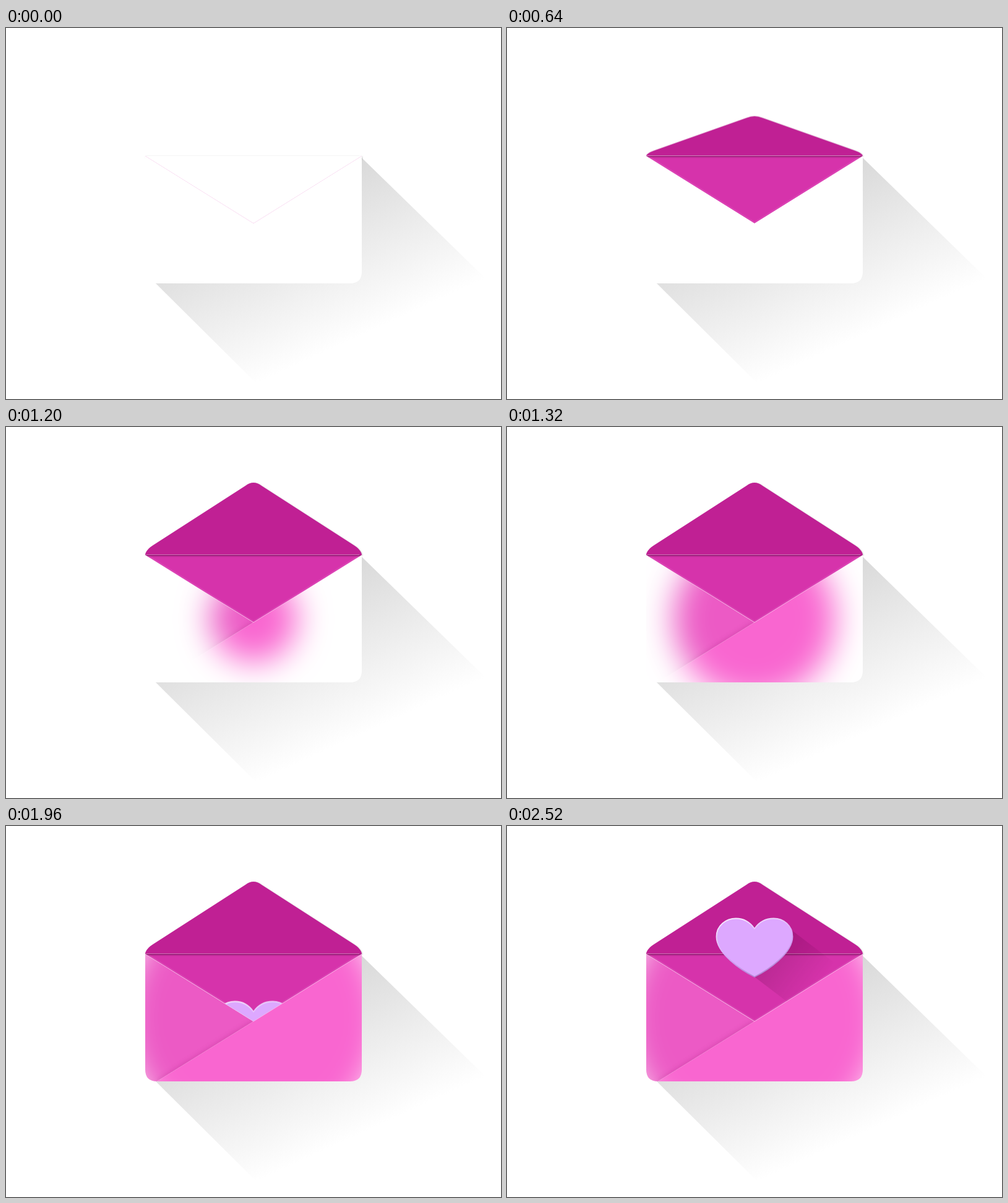
An HTML page for the animation above (3520 ms loop, 800 by 600 pixels).

```html
<!DOCTYPE html>
<html lang="en">
<head>
<meta charset="utf-8">
<title>Envelope</title>
<style>
html, body { margin: 0; width: 100%; height: 100%; overflow: hidden; background: #fff; }
svg { display: block; width: 100vw; height: 100vh; }

.flap, .fill, .heart, .cast, .glint { animation: 3520ms linear infinite; }
.flap { transform-origin: 400px 207px; animation-name: open; }
.fill { animation-name: spread; }
.heart { animation-name: rise; }
.cast { animation-name: deepen; }
.glint { animation-name: pass; }
.inner { filter: drop-shadow(1px 1px 1px rgba(0, 0, 0, .25)); }
.outer { filter: drop-shadow(0 1px 1.5px rgba(70, 0, 50, .75)); }

@keyframes open {
  0%, 2.273% { transform: scaleY(-1); }
  4.545% { transform: scaleY(-.9); }
  6.818% { transform: scaleY(-.72); }
  9.091% { transform: scaleY(-.5); }
  11.364% { transform: scaleY(-.256); }
  13.636% { transform: scaleY(.02); }
  15.909% { transform: scaleY(.3); }
  17.045% { transform: scaleY(.435); }
  19.318% { transform: scaleY(.66); }
  21.591% { transform: scaleY(.84); }
  23.864% { transform: scaleY(.96); }
  26.136% { transform: scaleY(1.017); }
  27.273% { transform: scaleY(1.024); }
  29.545% { transform: scaleY(1.013); }
  31.818% { transform: scaleY(1.003); }
  32.955%, 100% { transform: scaleY(1); }
}
@keyframes spread {
  0%, 30.114% { r: 0px; }
  42.045%, 100% { r: 210px; }
}
@keyframes rise {
  0%, 53.409% { transform: translateY(165px); }
  54.545% { transform: translateY(148px); }
  57.955% { transform: translateY(108px); }
  60.227% { transform: translateY(82px); }
  62.5% { transform: translateY(58px); }
  64.773% { transform: translateY(36px); }
  67.045% { transform: translateY(17px); }
  69.318% { transform: translateY(5px); }
  70.455% { transform: translateY(2px); }
  71.591%, 100% { transform: translateY(0); }
}
@keyframes deepen {
  0%, 57.955% { opacity: 0; }
  62.5% { opacity: .3; }
  71.591%, 100% { opacity: 1; }
}
@keyframes pass {
  0%, 5% { opacity: 0; }
  9%, 12% { opacity: .5; }
  16%, 100% { opacity: 0; }
}
</style>
</head>
<body>
<svg viewBox="0 0 800 600">
  <defs>
    <linearGradient id="ground" gradientUnits="userSpaceOnUse" x1="575" y1="210" x2="684" y2="447">
      <stop stop-color="#d9d9d9"/>
      <stop offset="1" stop-color="#fff"/>
    </linearGradient>
    <linearGradient id="heartShade" gradientUnits="userSpaceOnUse" x1="424" y1="203" x2="500" y2="260">
      <stop stop-color="#400030" stop-opacity=".2"/>
      <stop offset="1" stop-color="#400030" stop-opacity="0"/>
    </linearGradient>
    <linearGradient id="flapShade" gradientUnits="userSpaceOnUse" x1="310" y1="0" x2="420" y2="0">
      <stop stop-color="#400030" stop-opacity="0"/>
      <stop offset="1" stop-color="#400030" stop-opacity=".12"/>
    </linearGradient>
    <linearGradient id="rim" gradientUnits="userSpaceOnUse" x1="385" y1="150" x2="415" y2="240">
      <stop stop-color="#f4e4ff"/>
      <stop offset=".5" stop-color="#d6a3f6"/>
      <stop offset="1" stop-color="#b384d4"/>
    </linearGradient>
    <filter id="soft" filterUnits="userSpaceOnUse" x="0" y="0" width="800" height="600" color-interpolation-filters="sRGB">
      <feGaussianBlur stdDeviation="26"/>
    </filter>
    <filter id="crease" filterUnits="userSpaceOnUse" x="200" y="190" width="400" height="250" color-interpolation-filters="sRGB">
      <feGaussianBlur stdDeviation="3"/>
    </filter>
    <path id="flapShape" d="M225 207C225 202 231 195 238 191L387 95Q400 85 413 95L562 191C569 195 575 202 575 207Z"/>
    <path id="body" d="M225 207H575V394Q575 413 556 413H244Q225 413 225 394Z"/>
    <clipPath id="bodyClip"><use href="#body"/></clipPath>
    <clipPath id="pocket"><path d="M225 207H575L400 316Z"/></clipPath>
    <clipPath id="behind"><path d="M225 0H575V207L400 316L225 207Z"/></clipPath>
    <clipPath id="leftFace"><path d="M225 207L400 316L244 413H225Z"/></clipPath>
    <mask id="bloom" maskUnits="userSpaceOnUse" x="0" y="0" width="800" height="600">
      <g filter="url(#soft)"><circle class="fill" cx="400" cy="310" r="0" fill="#fff"/></g>
    </mask>
  </defs>

  <path fill="url(#ground)" d="M575 210L775 405L405 575L241 412Z"/>
  <path class="glint" fill="#f4f4f4" d="M575 207L630 217L622 238L575 255Z"/>

  <g class="inner"><use class="flap" href="#flapShape" fill="#c02094"/></g>
  <use href="#body" fill="#fff"/>
  <path d="M226 207H571" stroke="#eee" stroke-width=".8"/>

  <g clip-path="url(#pocket)">
    <path fill="#d633ab" d="M225 207H575L400 316Z"/>
    <path d="M225 207L400 316L575 207" fill="none" stroke="#e252bd" stroke-width="5" opacity=".5"/>
    <path class="flap" fill="url(#flapShade)" d="M229 200L480 -12L571 200Z"/>
    <g class="outer"><use class="flap" href="#flapShape" fill="#fff"/></g>
  </g>

  <g clip-path="url(#behind)">
    <g class="heart">
      <path class="cast" fill="url(#heartShade)" d="M400 244L462 170L542 231L480 305Z"/>
      <path fill="#dda8ff" stroke="url(#rim)" stroke-width="1.8"
        d="M400 244C378 233 338.500 206 338.500 179C338.500 161 354 149.500 370 149.500C383 149.500 393 156 400 166C407 156 417 149.500 431 149.500C447 149.500 461.500 161 461.500 179C461.500 206 422 233 400 244Z"/>
    </g>
  </g>

  <g mask="url(#bloom)">
    <g clip-path="url(#bodyClip)">
      <path fill="#f966d0" d="M575 207V413H244L400 316Z"/>
      <g clip-path="url(#leftFace)">
        <path fill="#ec5ac5" d="M225 207L400 316L244 413H225Z"/>
        <path d="M400 316L244 413" stroke="#d343ab" stroke-width="5" opacity=".75" filter="url(#crease)"/>
      </g>
      <path d="M225 207L400 316L575 207" fill="none" stroke="#fff" stroke-width="1" opacity=".35"/>
    </g>
  </g>
</svg>
</body>
</html>
```
